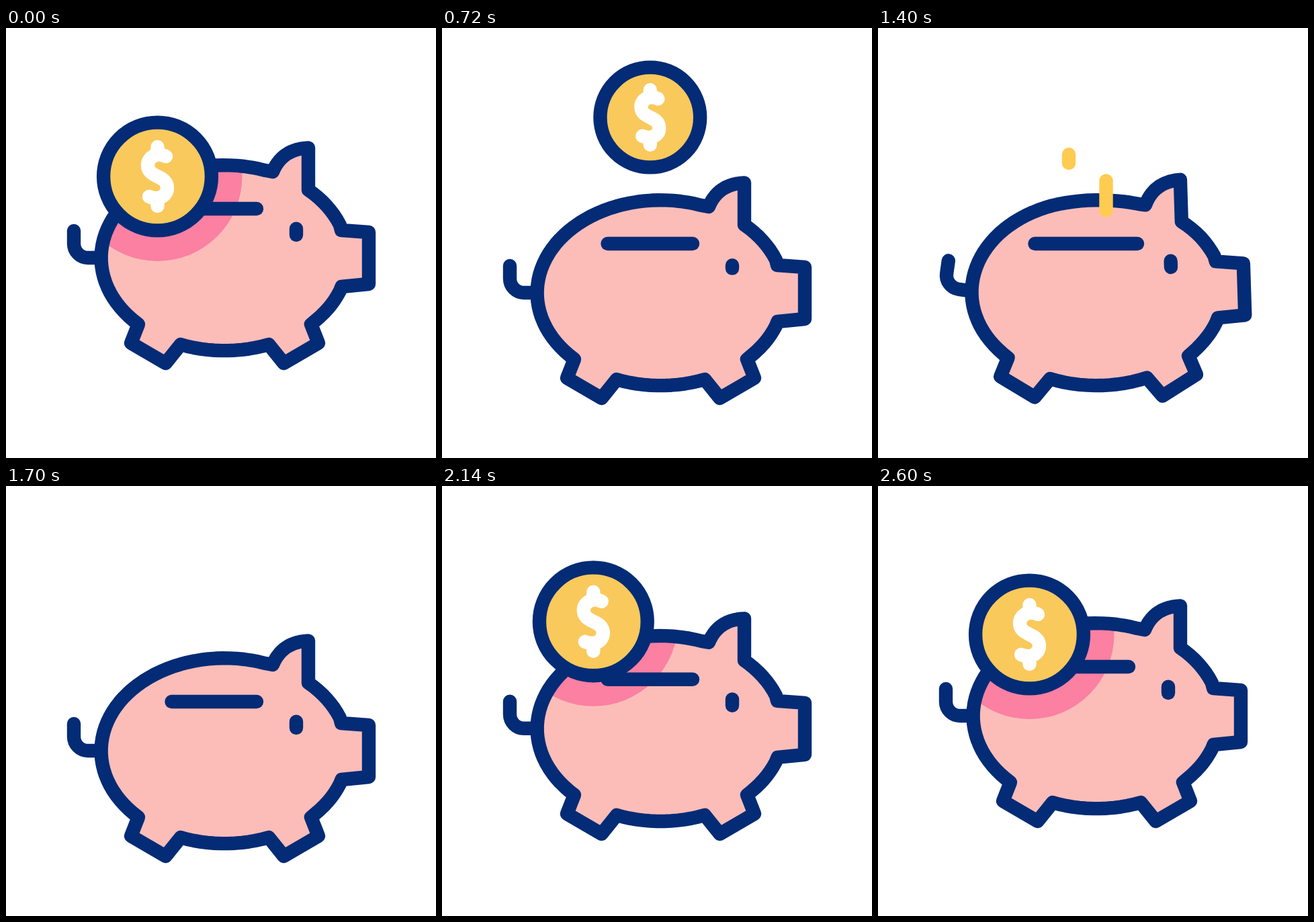
These frames come from a looping animation (640x640 px, 3 s). An HTML page with a canvas:

```html
<!DOCTYPE html>
<html lang="en">
<head>
<meta charset="utf-8">
<title>Piggy bank</title>
<style>
  html, body { margin: 0; width: 100%; height: 100%; overflow: hidden; background: #fff; }
  canvas { display: block; width: 640px; height: 640px; }
</style>
</head>
<body>
<canvas id="stage" width="640" height="640"></canvas>
<script>
const LOOP = 3000, LINE = 20.4;
const NAVY = '#042b75', PINK = '#fcbdb9', SHADE = '#fb80a2', GOLD = '#f9c95c', STREAK = '#ffcb50';
const CX = 325.3, CY = 342.2, RX = 183.7, RY = 138;
const ctx = document.getElementById('stage').getContext('2d');

// Timing helpers
const clamp = v => Math.min(1, Math.max(0, v));
const mix = (a, b, u) => a + (b - a) * u;
const span = (t, a, b) => clamp((t - a) / (b - a));
const ease = (t, a, b) => {
  const u = span(t, a, b);
  return u * u * (3 - 2 * u);
};
const hump = (t, a, peak, b) => ease(t, a, peak) - ease(t, peak, b);

// Motion of the pig
const pigY = t => 52 * (ease(t, 200, 720) - ease(t, 1880, 2320));
const bend = t => 3.75 * hump(t, 984, 1265, 1468);
const slotGrow = t => 30 * hump(t, 960, 1265, 1515);
const tailTurn = t => 8 * hump(t, 1265, 1400, 1560) - 11 * hump(t, 984, 1265, 1400);
const eyeOpen = t => 1 - hump(t, 680, 760, 840);

// The coin leaps, drops into the slot, then a new one lands
function coinAt(t) {
  if (t > 1500) {
    const height = 330 * Math.pow(Math.max(0, 2270 - t) / 470, 2.2);
    return { x: 225.5 - height * 0.01, y: 221 - height, k: 1, floor: 640 };
  }
  const leap = ease(t, 200, 720), fall = Math.max(0, t - 720) / 320;
  return {
    x: mix(225.5, 309.8, leap),
    y: mix(221, 133, leap) + 92 * fall * fall,
    k: 1 - 0.075 * leap - 0.215 * ease(t, 720, 1060),
    floor: t > 720 ? 321 : 640
  };
}

const streaks = [
  { x: 284, from: 54, to: 201, head: [840, 1314], tail: [890, 1450] },
  { x: 339.5, from: 140, to: 290, head: [1020, 1455], tail: [1040, 1660] }
];

// Both ends of the pig tip upwards around its back
function warp([x, y], b) {
  const w = b * mix(-0.014, 0.033, span(x, 260, 390));
  return [x + w * (y - 183), y - Math.abs(w) * 1.2 * Math.min(150, Math.abs(x - CX))];
}

// Clockwise along the body ellipse, with exact ends
function arc(from, to) {
  const angle = ([x, y]) => Math.atan2((y - CY) / RY, (x - CX) / RX);
  const a = angle(from);
  let b = angle(to);
  if (b < a) b += 2 * Math.PI;
  const n = Math.ceil((b - a) / 0.06);
  const inner = Array.from({ length: n - 1 }, (_, i) => {
    const k = mix(a, b, (i + 1) / n);
    return [CX + RX * Math.cos(k), CY + RY * Math.sin(k)];
  });
  return [from, ...inner, to];
}

function curve(p, c, q, n = 14) {
  return Array.from({ length: n + 1 }, (_, i) => {
    const u = i / n;
    return [0, 1].map(k => mix(mix(p[k], c[k], u), mix(c[k], q[k], u), u));
  });
}

const foot = [[454, 441], [465, 469], [413.5, 499], [391, 471]];
const backFoot = foot.map(([x, y]) => [651 - x, y]).reverse();
const earBase = [397, 214];
const outline = [
  ...arc([450, 241], [499, 301]), [540, 304], [540, 381],
  ...arc([499.5, 385], foot[0]), ...foot.slice(1, 3),
  ...arc(foot[3], backFoot[0]), ...backFoot.slice(1, 3),
  ...arc(backFoot[3], earBase),
  ...curve(earBase, [411, 180], [450, 178.5])
];

const tailPath = new Path2D('M101 302V321A21 21 0 0 0 122 342H142');
const dollar = new Path2D('M12.5-30C-2-37-14.5-28-14.5-17C-14.5 3 14.5-3 14.5 17C14.5 29 2 36-12.5 30M0-44V-32M0 44V32');

function disc(x, y, r) {
  const p = new Path2D();
  p.arc(x, y, r, 0, 2 * Math.PI);
  return p;
}

function stroke(path, color, width = LINE) {
  ctx.strokeStyle = color;
  ctx.lineWidth = width;
  ctx.stroke(path);
}

function fill(path, color) {
  ctx.fillStyle = color;
  ctx.fill(path);
}

function line(x1, y1, x2, y2, color) {
  const p = new Path2D();
  p.moveTo(x1, y1);
  p.lineTo(x2, y2);
  stroke(p, color);
}

function group(paint) {
  ctx.save();
  paint();
  ctx.restore();
}

function clipTo(floor) {
  ctx.beginPath();
  ctx.rect(0, 0, 640, floor);
  ctx.clip();
}

function drawPig(t, coin) {
  const dy = pigY(t), b = bend(t);
  const place = p => {
    const [x, y] = warp(p, b);
    return [x, y + dy];
  };

  group(() => {
    ctx.translate(...place([142, 342]));
    ctx.rotate(tailTurn(t) * Math.PI / 180);
    ctx.translate(-142, -342);
    stroke(tailPath, NAVY);
  });

  const body = new Path2D();
  outline.forEach(p => body.lineTo(...place(p)));
  body.closePath();
  fill(body, PINK);
  group(() => {
    clipTo(coin.floor);
    ctx.clip(body);
    fill(disc(coin.x, coin.y, 18 + 108 * coin.k), SHADE);
  });
  stroke(body, NAVY);

  const g = slotGrow(t), lid = 4.6 * eyeOpen(t) + 0.05;
  line(246.5 - g, 269 + dy, 373 + g, 269 + dy, NAVY);
  line(...place([432, 303.4 - lid]), ...place([432, 303.4 + lid]), NAVY);
}

function drawCoin({ x, y, k, floor }) {
  group(() => {
    clipTo(floor);
    const rim = disc(x, y, 80.4 * k);
    fill(rim, GOLD);
    stroke(rim, NAVY);
    ctx.translate(x, y);
    ctx.scale(k, k);
    stroke(dollar, '#fff', LINE / k);
  });
}

function draw(t) {
  ctx.clearRect(0, 0, 640, 640);
  ctx.lineCap = ctx.lineJoin = 'round';
  const coin = coinAt(t);
  drawPig(t, coin);
  drawCoin(coin);
  for (const { x, from, to, head, tail } of streaks) {
    const top = mix(from, to, span(t, ...tail)), bottom = mix(from, to, span(t, ...head));
    if (bottom - top > 0.1) line(x, top, x, bottom, STREAK);
  }
}

const start = performance.now();
function tick() {
  draw((performance.now() - start) % LOOP);
  requestAnimationFrame(tick);
}
tick();
</script>
</body>
</html>
```
